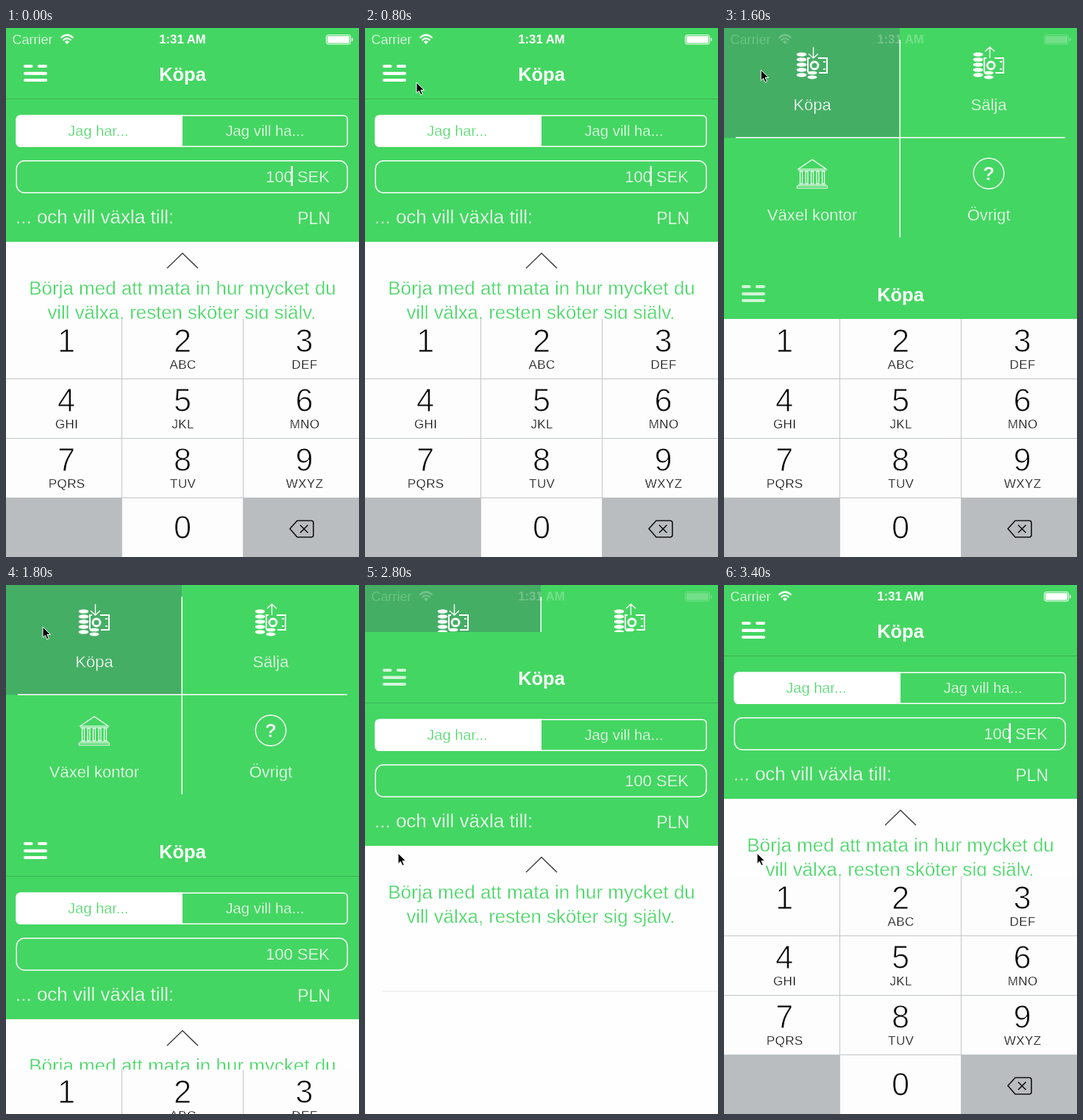
Write an HTML page that moves like this. It is 480x720 px and loops after 3.5 s.

```html
<!DOCTYPE html>
<html lang="sv">
<head>
<meta charset="utf-8">
<style>
html, body { margin: 0; width: 100%; height: 100%; overflow: hidden; background: #44d662; }
svg { display: block; width: 480px; height: 720px; }
text { font-family: "Liberation Sans", Arial, sans-serif; }
</style>
</head>
<body>
<svg id="stage" viewBox="0 0 480 720"></svg>
<script>
const GREEN = '#44d662', TILE = '#45ae65', PAPER = '#fefefe', KEY = '#fdfdfd';

const text = (x, y, size, label, attrs = '') =>
  `<text x="${x}" y="${y}" font-size="${size}" ${attrs}>${label}</text>`;
const centered = (x, y, size, label, attrs = '') =>
  text(x, y, size, label, `text-anchor="middle" ${attrs}`);
const rect = (x, y, w, h, attrs = '') =>
  `<rect x="${x}" y="${y}" width="${w}" height="${h}" ${attrs}/>`;
const line = (d, color, width, attrs = '') =>
  `<path d="${d}" fill="none" stroke="${color}" stroke-width="${width}" ${attrs}/>`;
// A stroke in the background colour makes the letters lighter.
const thin = (background, width = 0.4) =>
  `stroke="${background}" stroke-width="${width}"`;

function moneyIcon(x, arrowHead) {
  let coins = '';
  for (let i = 0; i < 5; i++)
    coins += `<ellipse cx="105.5" cy="${36 + i * 7}" rx="6.8" ry="2.7"/>`;
  return `<g transform="translate(${x})" fill="#fff">${coins}
    <ellipse cx="120" cy="61" rx="6.5" ry="2.3"/>
    <ellipse cx="120" cy="67" rx="6.5" ry="2.6"/>
    ${line('M117 41H114V60M128 41H140V61H129', '#fff', 2)}
    ${line('M135 46h3M135 56h3', '#fff', 2)}
    <circle cx="123" cy="51" r="5" fill="none" stroke="#fff" stroke-width="2.800"/>
    ${line('M121.500 26V41' + arrowHead, '#fff', 1.4)}</g>`;
}

function bankIcon() {
  let columns = '';
  for (let i = 0; i < 5; i++) columns += rect(103.5 + i * 7.5, 195, 3, 17);
  return `<g fill="none" stroke="#fff" stroke-width="1.200">
    <path d="M101 192L120 179L139 192ZM101 194H139M101 213H139M99.500 218V215H140.500V218Z"/>
    ${columns}</g>`;
}

function menu() {
  return rect(0, 0, 480, 720, `fill="${GREEN}"`)
    + rect(0, 0, 239, 149.5, `fill="${TILE}"`)
    + line('M16 149.250H464M239.250 16V285', '#fff', 1.5)
    + moneyIcon(0, 'M115 35L121.500 41L128 35')
    + moneyIcon(240, 'M115 32L121.500 26L128 32')
    + bankIcon()
    + '<circle cx="360" cy="198" r="20.700" fill="none" stroke="#fff" stroke-width="1.400"/>'
    + `<g fill="#fff" ${thin(GREEN)}>${centered(360, 207, 26, '?', 'font-weight="bold"')}`
    + centered(120, 112, 22, 'Köpa', thin(TILE)) + centered(360, 112, 22, 'Sälja')
    + centered(120, 262, 22, 'Växel kontor') + centered(360, 262, 22, 'Övrigt') + '</g>';
}

function sheet() {
  const bars = line('M26 52H34.500M45 52H54M26 61.800H54M26 71H54', '#fff', 4.2,
    'id="burger" stroke-linecap="round"');
  return `<g id="sheet">${rect(0, 0, 480, 291, `fill="${GREEN}"`)}
    ${rect(0, 291, 480, 500, `fill="${PAPER}"`)}
    ${bars}
    ${centered(240, 72, 25.5, 'Köpa', 'fill="#fff" font-weight="bold"')}
    ${rect(0, 96, 480, 0.8, 'fill="#36ac4f"')}
    <g fill="none" stroke="#fff" stroke-width="1.500">
      ${rect(14.25, 119.25, 450, 42, 'rx="5"')}
      ${rect(14.25, 180.75, 450, 43.5, 'rx="11"')}
    </g>
    <path d="M240 118.500V162H19.500a6 6 0 0 1-6-6V124.500a6 6 0 0 1 6-6Z" fill="#fff"/>
    ${centered(125.5, 147, 20, 'Jag har...', `fill="${GREEN}" ${thin('#fff')}`)}
    <g fill="#fff" ${thin(GREEN)}>
      ${centered(352, 147, 20.3, 'Jag vill ha...')}
      ${text(440, 210, 22, '100 SEK', 'text-anchor="end"')}
      ${text(441, 267, 23, 'PLN', 'text-anchor="end"')}
      ${text(13, 266, 26, '... och vill växla till:')}
    </g>
    ${rect(387.5, 188, 2.5, 27, 'id="caret" fill="#fff"')}
    ${line('M219 327L240 306.500L261 327', '#444', 1.5)}
    <g fill="${GREEN}" ${thin(PAPER)}>
      ${centered(240, 363, 26, 'Börja med att mata in hur mycket du')}
      ${centered(239, 396, 25.8, 'vill välxa, resten sköter sig själv.')}
    </g>
    ${rect(24, 488.5, 456, 1, 'fill="#e6e6e6"')}
  </g>`;
}

function keyboard() {
  const letters = ['', 'ABC', 'DEF', 'GHI', 'JKL', 'MNO', 'PQRS', 'TUV', 'WXYZ'];
  const columns = [82, 240, 405.5];
  const keys = letters.map((label, i) => {
    const x = columns[i % 3], y = Math.floor(i / 3) * 81;
    return centered(x, 441 + y, 43.5, i + 1, thin(KEY, 1.1))
      + centered(x + 0.7, 464 + y, 17, label, 'letter-spacing=".400" ' + thin(KEY, 0.35));
  }).join('');
  return `<g id="keyboard">${rect(0, 396, 480, 324, `fill="${KEY}"`)}
    ${rect(0, 639, 157, 81, 'fill="#b9bdc0"')}${rect(323, 639, 157, 81, 'fill="#b9bdc0"')}
    ${line('M0 477.500H480M0 558.500H480M0 639.500H480M157.500 396V720M322.500 396V720', '#c2c5c8', 1)}
    <g fill="#0a0a0a">${keys}${centered(240, 695, 43.5, 0, thin(KEY, 1.1))}</g>
    ${line('M386 681.500L396 670.500H415Q418 670.500 418 673.500V690Q418 693 415 693H396ZM400 676.500L410.500 687M410.500 676.500L400 687',
      '#111', 1.6, 'stroke-linejoin="round"')}
  </g>`;
}

function statusBar() {
  return `<g id="status" fill="#fff">
    ${text(8.5, 22, 18, 'Carrier', thin(GREEN))}
    ${line('M74.500 13.500Q83 5.500 91.500 13.500M77.500 16.800Q83 11.500 88.500 16.800', '#fff', 2.2)}
    <path d="M79.800 18.800Q83 15.800 86.200 18.800L83 22Z"/>
    ${centered(240, 21, 16.8, '1:31 AM', 'font-weight="bold"')}
    ${rect(435.5, 9.5, 33, 12.5, 'rx="2.500" fill="none" stroke="#fff"')}
    ${rect(437, 11, 30, 9.5, 'rx="1"')}
    <path d="M470 13.500Q472 13.500 472 15.800Q472 18 470 18Z"/>
  </g>`;
}

const pointer = `<path id="pointer" d="M0 0V14.500L3.300 11.500L5.800 17L8.300 15.900L5.900 10.500H10.500Z"
  fill="#050505" stroke="#fff" stroke-width="1"/>`;

document.getElementById('stage').innerHTML =
  menu() + sheet() + keyboard() + statusBar() + pointer;
const part = Object.fromEntries(
  ['sheet', 'burger', 'caret', 'keyboard', 'status', 'pointer']
    .map(id => [id, document.getElementById(id)]));

const LOOP = 3500, STEP = 100;
const progress = (t, from, to) => Math.min(1, Math.max(0, (t - from) / (to - from)));
const easeInOut = p => p < 0.5 ? 2 * p * p : 1 - 2 * (1 - p) ** 2;
const easeOut = p => 1 - (1 - p) ** 3;

// time, x, y
const pointerPath = [
  [500, 490, 170], [800, 70, 74], [1000, 51, 57], [1200, 50.5, 57],
  [1900, 50, 57], [2300, 47, 374], [2500, 45, 365], [3500, 45, 365]
];

function pointerAt(t) {
  if (t < pointerPath[0][0]) return [-50, -50];
  const i = pointerPath.findIndex(p => p[0] > t);
  const [t0, x0, y0] = pointerPath[i - 1], [t1, x1, y1] = pointerPath[i];
  const p = easeInOut(progress(t, t0, t1));
  return [x0 + (x1 - x0) * p, y0 + (y1 - y0) * p];
}

function caretAlpha(t) {
  if (t >= 3200) return 1;
  if (t >= 1200) return 0;
  if (t < 400) return 1;
  return t < 700 ? 0 : 0.85;
}

function draw(t) {
  const open = easeInOut(progress(t, 1300, 1597)) - easeInOut(progress(t, 2600, 2897));
  const lowered = easeOut(progress(t, 1650, 2000)) - easeOut(progress(t, 2950, 3300));
  const pressed = (t >= 1300 && t < 1700) || (t >= 2600 && t < 2900);
  part.sheet.setAttribute('transform', `translate(0 ${Math.round(300 * open)})`);
  part.keyboard.setAttribute('transform', `translate(0 ${324 * lowered})`);
  part.status.setAttribute('opacity',
    1 - progress(t, 1375, 1675) + progress(t, 2725, 3025));
  part.burger.setAttribute('opacity', pressed ? 0.75 : 1);
  part.caret.setAttribute('opacity', caretAlpha(t));
  part.pointer.setAttribute('transform', `translate(${pointerAt(t)})`);
}

const start = performance.now();
function tick() {
  const t = (performance.now() - start) % LOOP;
  draw(Math.floor(t / STEP) * STEP);
  requestAnimationFrame(tick);
}
tick();
</script>
</body>
</html>
```
